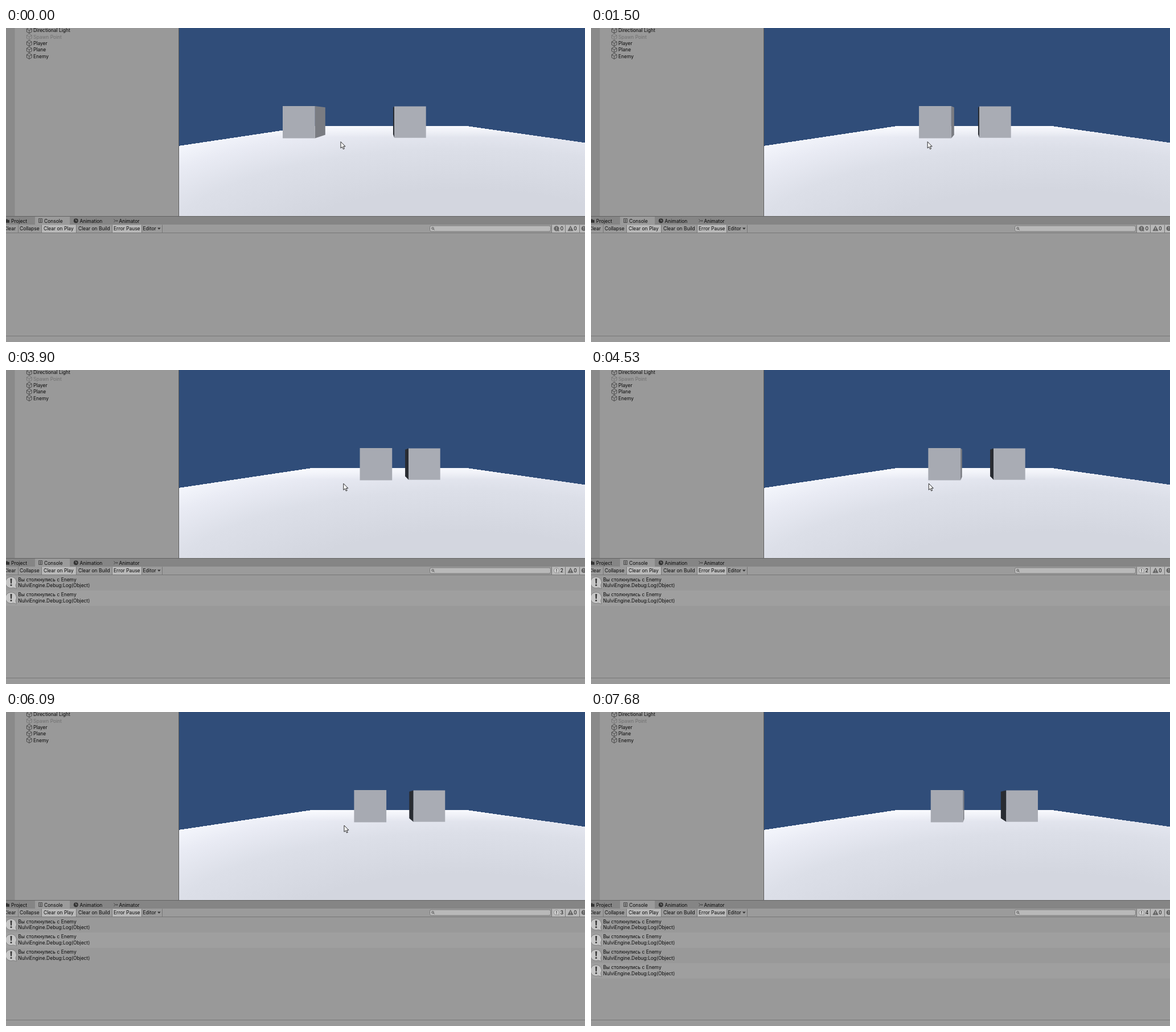
These frames come from a looping animation (1017 px wide and 551 px high, 7800 ms). An HTML page:

```html
<!DOCTYPE html>
<html lang="en">
<head>
<meta charset="utf-8">
<title>Collision log</title>
<style>
html, body { margin: 0; width: 100%; height: 100%; overflow: hidden; background: #999; }
svg { display: block; width: 1017px; height: 551px; }
text { font: 8.45px Inter, "Liberation Sans", sans-serif; fill: #090909; white-space: pre; }
.off { fill: #707070; }
.crisp { shape-rendering: crispEdges; }
.line { stroke: #777; fill: none; }
.lit { fill: #b9b9b9; }
.icon { fill: none; stroke: #3c3c3c; stroke-width: .85; stroke-linejoin: round; }
.dark { fill: #333; }
</style>
</head>
<body>
<svg viewBox="0 0 1017 551">
  <defs>
    <radialGradient id="shade" gradientUnits="userSpaceOnUse" cx="0" cy="0" r="770"
      gradientTransform="translate(800 400) scale(1 .35)">
      <stop offset=".43" stop-color="#d3d6df"/>
      <stop offset=".7" stop-color="#dcdfe8"/>
      <stop offset=".86" stop-color="#e9ebf4"/>
      <stop offset="1" stop-color="#f8faff"/>
    </radialGradient>
    <linearGradient id="haze" gradientUnits="userSpaceOnUse" x1="0" y1="172" x2="0" y2="192">
      <stop offset="0" stop-color="#fbfcff" stop-opacity=".85"/>
      <stop offset="1" stop-color="#fbfcff" stop-opacity="0"/>
    </linearGradient>
    <clipPath id="view"><rect x="303" width="714" height="330"/></clipPath>
    <path id="floor" d="M303 207 537 172H809L1017 201.300V330H303Z"/>
    <path id="cube" class="icon" d="M0-5 4.400-2.600V2.600L0 5-4.400 2.600V-2.600ZM-4.400-2.600 0 0 4.400-2.600M0 0V5"/>
    <g id="note" transform="translate(0 .6)">
      <path d="M9 362.500a9.600 9.600 0 0 1 8 14.800l1.500 5.700-6-1.600A9.800 9.800 0 1 1 9 362.500Z" fill="#c6c6c6" stroke="#737373" stroke-width=".8"/>
      <path d="M7.600 365.500h2.900l-.5 8.600h-1.900Z" class="dark"/>
      <circle cx="9" cy="377" r="1.500" class="dark"/>
    </g>
  </defs>

  <rect width="1017" height="551" fill="#999"/>
  <rect width="15.500" height="330" fill="#8a8a8a"/>
  <g id="tree"></g>

  <g clip-path="url(#view)">
    <g class="crisp">
      <rect x="303" width="714" height="330" fill="#304d79"/>
      <use href="#floor" fill="url(#shade)"/>
      <use href="#floor" fill="url(#haze)"/>
    </g>
    <path id="foeSide" fill="#292c32"/>
    <rect id="foe" y="137.500" width="55.700" height="55.200" fill="#a9acb4"/>
    <path id="heroSide" fill="#7a7c82"/>
    <rect id="hero" y="137" width="56.700" height="56.500" fill="#a7aab2"/>
    <path id="cursor" d="M0 0V11.300L2.600 8.900 4.400 13 6.300 12.200 4.500 8.200H8Z" fill="#fff" stroke="#111" stroke-width=".9"/>
  </g>
  <path d="M303.500 0V330" stroke="#5d5d5d"/>

  <rect y="330" width="1017" height="15" fill="#858585"/>
  <path d="M0 330.500H1017" stroke="#626262"/>
  <rect x="51" y="331" width="61" height="14.500" fill="#9b9b9b"/>
  <path d="M0 335.500h2.500l1 1.200H6v5H0Z" class="dark"/>
  <path d="M57.500 334.500h6v7h-6ZM59 336.500h3M59 338.300h3M59 340h3" class="icon"/>
  <circle cx="122.800" cy="338.300" r="4" class="dark"/>
  <path d="M122.800 335.500v3h2.200" stroke="#999" fill="none" stroke-width=".9"/>
  <path d="M189.500 335.500 192 338.300H196M192 338.300 189.500 341M194.500 336.800 196 338.300 194.500 339.800" class="icon"/>
  <text x="9" y="341.800">Project</text>
  <text x="67" y="341.800">Console</text>
  <text x="129.500" y="341.800">Animation</text>
  <text x="198.500" y="341.800">Animator</text>

  <rect y="345" width="1017" height="14" fill="#9b9b9b"/>
  <rect x="62.500" y="345.500" width="61" height="13.500" class="lit"/>
  <rect x="186.500" y="345.500" width="51.500" height="13.500" class="lit"/>
  <path d="M0 359.500H1017M21.500 345.500V359M62.500 345.500V359M123.500 345.500V359M186.500 345.500V359M238.500 345.500V359M274.500 345.500V359" class="line"/>
  <path d="M266 350.500h5.600l-2.800 3.200Z" class="dark"/>
  <text x="-4" y="355.200">Clear</text>
  <text x="24" y="355.200">Collapse</text>
  <text x="66" y="355.200">Clear on Play</text>
  <text x="127" y="355.200">Clear on Build</text>
  <text x="189" y="355.200">Error Pause</text>
  <text x="240.500" y="355.200">Editor</text>

  <g id="search">
    <rect x="744.500" y="347" width="212" height="10" rx="2.500" fill="#b9b9b9" stroke="#777" stroke-width=".9"/>
    <path d="M750.800 352.800 752.600 354.500" class="icon"/>
    <circle cx="749.600" cy="351.500" r="1.700" class="icon"/>
    <path d="M959 345.500H983V359H959Z" class="lit"/>
    <path d="M958.500 345.500V359" class="line"/>
    <path id="bubble" d="M967 347.500a4.400 4.400 0 0 1 3.700 6.600l.6 2.300-2.600-.5A4.400 4.400 0 1 1 967 347.500Z" stroke="#777" stroke-width=".7"/>
    <path id="mark" d="M967 349.200v3.300M967 353.600v1.200" stroke-width="1.200"/>
    <text id="count" x="973.800" y="355.200"></text>
  </g>
  <path d="M983 345.500H1017V359H983Z" class="lit"/>
  <path d="M982.500 345.500V359M1007.500 345.500V359" class="line"/>
  <path d="M991.500 347.500 996 355.800H987Z" fill="#666" stroke="#666" stroke-linejoin="round"/>
  <path d="M991.500 350v3M991.500 354v1" stroke="#bbb"/>
  <text x="997.300" y="355.200">0</text>
  <circle cx="1014.800" cy="351.700" r="4.300" fill="#666"/>
  <path d="M1014.800 349v3M1014.800 353v1.200" stroke="#bbb"/>

  <g id="rows"></g>
  <path d="M0 540.500H1017" class="line"/>
</svg>
<script>
const el = id => document.getElementById(id);
const set = (id, name, value) => el(id).setAttribute(name, value);

el("tree").innerHTML = ["Directional Light", "Spawn Point", "Player", "Plane", "Enemy"].map((name, i) => {
  const y = 4.2 + i * 11.3, off = name === "Spawn Point";
  return `<use href="#cube" x="40.8" y="${y}" opacity="${off ? .4 : 1}"/>
    <text x="48" y="${y + 3.1}" class="${off ? "off" : ""}">${name}</text>`;
}).join("");

el("rows").innerHTML = [0, 1, 2, 3].map(i => `<g transform="translate(0 ${i * 26.9})">
  <rect y="360" width="1017" height="27" fill="${i % 2 ? "#9f9f9f" : "#999"}"/><use href="#note"/>
  <text x="21.3" y="370.5">Вы столкнулись с Enemy</text>
  <text x="21.3" y="381">NulviEngine.Debug:Log(Object)</text></g>`).join("");

// The picture changes once per tick
const LOOP = 7800, TICK = 130, LAST = LOOP / TICK - 1;

// Turning points as [tick, x, y], joined by cosine easing
const path = [[0, 486], [3, 486], [17.4, 639.5], [21, 601], [27, 651], [33.5, 584],
  [40.5, 660.5], [46, 606], [51.5, 674], [59.5, 596]];
const pointer = [[0, 588, 199.6], [1, 580, 192], [2, 588, 199.6], [4, 591, 199.6],
  [50, 594, 199], [53, 740.5, 237.5], [55, 1100, 340], [60, 1100, 340]];

function at(keys, tick, col = 1) {
  const i = keys.findIndex(k => k[0] > tick), a = keys[i - 1], b = keys[i];
  const u = (tick - a[0]) / (b[0] - a[0]);
  return a[col] + (b[col] - a[col]) * (1 - Math.cos(Math.PI * u)) / 2;
}

// The enemy stays where the player pushed it; each new push writes a log line
function pushes(tick) {
  let reach = 626, logs = 0, pushing = false;
  for (let k = 0; k <= tick; k++) {
    const x = at(path, k), hit = x > reach + 3;
    if (hit && !pushing) logs++;
    pushing = hit;
    reach = Math.max(reach, x);
  }
  return { foe: reach + 56, logs };
}

// Side face of a box, receding to the vanishing point
const vx = 667.6, vy = 152;
function side(x, top, bottom, depth) {
  const to = (a, v) => a + (v - a) * depth;
  return `M${x} ${top}L${to(x, vx)} ${to(top, vy)}V${to(bottom, vy)}L${x} ${bottom}Z`;
}

function draw(t) {
  const tick = Math.min(LAST, Math.floor((t + 25) / TICK));
  const hero = at(path, tick), edge = hero + 56.7;
  const { foe, logs } = pushes(tick);

  set("hero", "x", hero);
  set("heroSide", "d", edge < vx ? side(edge, 137, 193.5, .145) : "");
  set("foe", "x", foe);
  set("foeSide", "d", side(foe + .2, 137.5, 192.7, .155));
  set("cursor", "transform", `translate(${at(pointer, tick)} ${at(pointer, tick, 2)})`);

  [...el("rows").children].forEach((row, i) => row.style.display = i < logs ? "" : "none");
  el("count").textContent = logs;
  set("bubble", "fill", logs ? "#d2d2d2" : "#666");
  set("mark", "stroke", logs ? "#333" : "#bbb");
  set("search", "transform", `translate(${logs === 1 ? 1.5 : 0} 0)`);
}

const start = performance.now();
function loop() {
  draw((performance.now() - start) % LOOP);
  requestAnimationFrame(loop);
}
loop();
</script>
</body>
</html>
```
